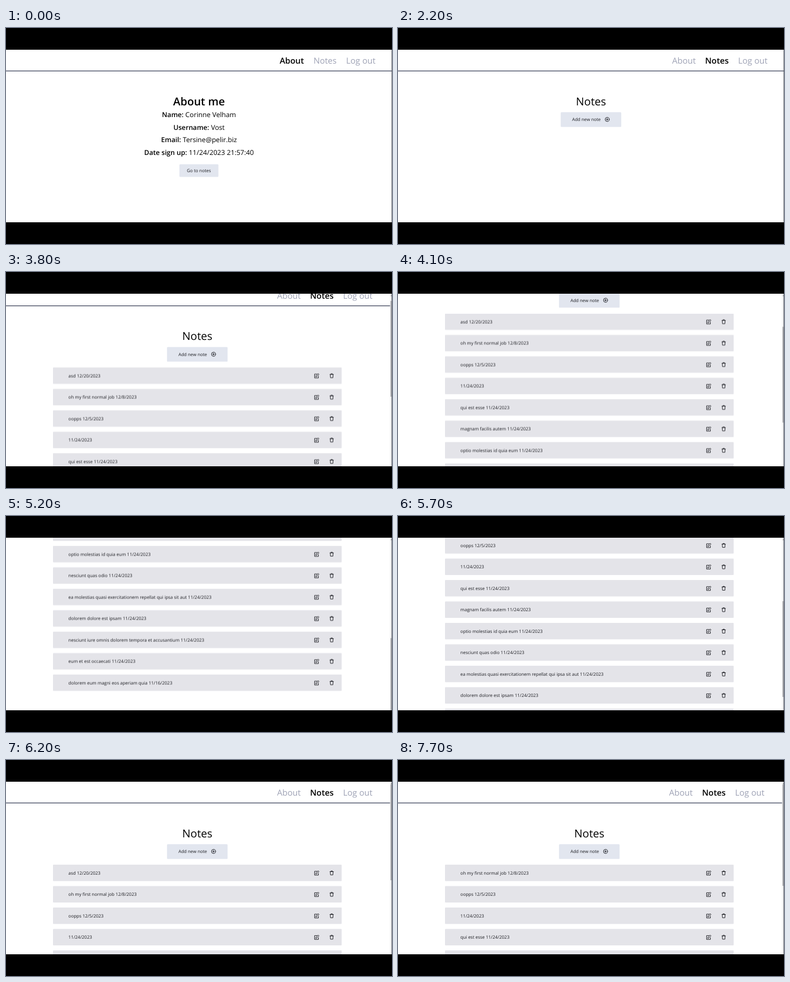
Animation of 690 by 388 pixels, one loop 8000 ms. Source, as an HTML page:

```html
<!DOCTYPE html>
<html lang="en">
<head>
<meta charset="utf-8">
<title>Notes app</title>
<style>
  @property --s { syntax: '<length>'; inherits: true; initial-value: 0px; }
  html, body { margin: 0; width: 100%; height: 100%; overflow: hidden; background: #000; }
  #stage {
    display: block; width: 690px; height: 388px;
    font-family: "Open Sans", "Noto Sans", sans-serif;
    text-rendering: geometricPrecision;
    animation: scroll 8s step-end infinite;
  }
  .nav { font-size: 15px; fill: #9ea2b5; }
  .on { font-size: 14.8px; font-weight: 600; fill: #000; }
  .title { font-size: 19.6px; }
  .info { font-size: 12.2px; }
  .mid { text-anchor: middle; }
  .small { font-size: 7.95px; fill: #1c1d22; }
  b, .bold { font-weight: 600; }
  .btn { fill: #e2e6ef; }
  .row { fill: #e4e4e9; }
  .icon { fill: none; stroke: #1c1d22; stroke-width: .95; stroke-linejoin: round; stroke-linecap: round; }

  .page { transform: translateY(calc(-1 * var(--s))); }
  .thumb { height: 172px; transform: translateY(calc(.48 * var(--s))); }

  .about, .notes, .loaded, .shift3, .shift5, .list, .first, .thumb {
    animation: 8s step-end infinite;
  }
  .about { animation-name: leave; }
  .notes { animation-name: enter; }
  .loaded { animation-name: load; }
  .shift3 { animation-name: shift3; }
  .shift5 { animation-name: shift5; }
  .list { animation-name: close; }
  .first { animation-name: remove; }
  .thumb { animation-name: grow; }

  @keyframes leave { 0% { visibility: visible } 27.5%, 100% { visibility: hidden } }
  @keyframes enter { 0% { visibility: hidden } 27.5%, 100% { visibility: visible } }
  @keyframes load { 0% { opacity: 0 } 28.75%, 100% { opacity: 1 } }
  @keyframes shift3 { 0% { transform: none } 28.75%, 100% { transform: translateX(-3px) } }
  @keyframes shift5 { 0% { transform: none } 28.75%, 100% { transform: translateX(-5.5px) } }
  @keyframes close { 0% { transform: none } 96.25%, 100% { transform: translateY(-38.5px) } }
  @keyframes remove { 0% { opacity: 1 } 96.25%, 100% { opacity: 0 } }
  @keyframes grow { 0% { height: 172px } 96.25%, 100% { height: 182px } }
  @keyframes scroll {
    0% { --s: 0px }
    47.5% { --s: 16.5px }
    48.75% { --s: 66px }
    50% { --s: 103px }
    51.25% { --s: 113.5px }
    55% { --s: 135px }
    56.25% { --s: 200px }
    57.5% { --s: 227px }
    62.5% { --s: 270px }
    63.75% { --s: 340px }
    65% { --s: 365.3px }
    66.25% { --s: 362px }
    67.5% { --s: 345px }
    68.75% { --s: 318px }
    70% { --s: 278px }
    71.25% { --s: 227px }
    72.5% { --s: 130px }
    73.75% { --s: 35px }
    75% { --s: 14px }
    76.25% { --s: 4px }
    77.5%, 100% { --s: 0px }
  }
</style>
</head>
<body>
<svg id="stage" viewBox="0 0 690 388">
  <defs>
    <g id="edit" class="icon">
      <path d="M.6-3.1H-3.8V3.8H3.1V.8"/>
      <path d="M-1.6 1.5L-1.2-.4 2.7-4 4.2-2.5.3 1.2Z"/>
    </g>
    <g id="trash" class="icon">
      <path d="M-3.2-2.3H3.2M-1.3-2.4V-3.5H1.3V-2.4M-2.5-2.2L-2.2 3.6H2.2L2.5-2.2"/>
    </g>
    <g id="plus" class="icon">
      <circle r="3.7"/>
      <path d="M-1.7 0H1.7M0-1.7V1.7"/>
    </g>
  </defs>

  <svg y="39" width="690" height="310" viewBox="0 39 690 310">
    <rect y="39" width="690" height="310" fill="#fff"/>
    <g class="page">
      <rect y="76.5" width="690" height="1.4" fill="#4b5166"/>

      <g class="about">
        <g class="nav">
          <text class="on" x="489.3" y="64">About</text>
          <text x="549.7" y="64">Notes</text>
          <text x="608" y="64">Log out</text>
        </g>
        <text class="title bold mid" x="345" y="138.6">About me</text>
        <g class="info mid">
          <text x="345" y="160.4"><tspan class="bold">Name:</tspan> Corinne Velham</text>
          <text x="345" y="182.8"><tspan class="bold">Username:</tspan> Vost</text>
          <text x="345" y="205.3"><tspan class="bold">Email:</tspan> Tersine@pelir.biz</text>
          <text x="345" y="227.7"><tspan class="bold">Date sign up:</tspan> 11/24/2023 21:57:40</text>
        </g>
        <rect class="btn" x="310" y="244.7" width="69.7" height="22.8" rx="1.5"/>
        <text class="small mid" x="344.8" y="259">Go to notes</text>
      </g>

      <g class="notes">
        <g class="nav shift5">
          <text x="490" y="64">About</text>
          <text class="on" x="549" y="64">Notes</text>
          <text x="608" y="64">Log out</text>
        </g>
        <g class="shift3">
          <text class="title mid" x="345" y="138.6">Notes</text>
          <rect class="btn" x="290.8" y="151.3" width="108.3" height="26.4" rx="1.5"/>
          <text class="small" x="311.2" y="167">Add new note</text>
          <use href="#plus" x="374" y="164.2"/>
        </g>
        <g class="loaded"><g class="list" id="list"></g></g>
      </g>
    </g>

    <g class="loaded">
      <rect x="686.5" y="39" width="3.5" height="310" fill="#f1f1f2"/>
      <path d="M687.6 43.2L689.6 40.8V43.2Z" fill="#777"/>
      <rect class="thumb" x="687" y="44" width="3" fill="#bcbcc0"/>
    </g>
    <rect x="689.2" y="39" width=".8" height="310" fill="#555a62"/>
  </svg>
</svg>
<script>
  const notes = [
    'asd 12/20/2023',
    'oh my first normal job 12/8/2023',
    'oopps 12/5/2023',
    '11/24/2023',
    'qui est esse 11/24/2023',
    'magnam facilis autem 11/24/2023',
    'optio molestias id quia eum 11/24/2023',
    'nesciunt quas odio 11/24/2023',
    'ea molestias quasi exercitationem repellat qui ipsa sit aut 11/24/2023',
    'dolorem dolore est ipsam 11/24/2023',
    'nesciunt iure omnis dolorem tempora et accusantium 11/24/2023',
    'eum et est occaecati 11/24/2023',
    'dolorem eum magni eos aperiam quia 11/16/2023'
  ];
  const pitch = 38.5;
  document.getElementById('list').innerHTML = notes.map((note, i) => {
    const y = 188 + i * pitch;
    return `<g${i ? '' : ' class="first"'}>
      <rect class="row" x="84" y="${y}" width="516" height="29.6" rx="1"/>
      <text class="small" x="111.6" y="${y + 17.8}">${note}</text>
      <use href="#edit" x="555.4" y="${y + 15}"/>
      <use href="#trash" x="582.2" y="${y + 14.8}"/>
    </g>`;
  }).join('');
</script>
</body>
</html>
```
